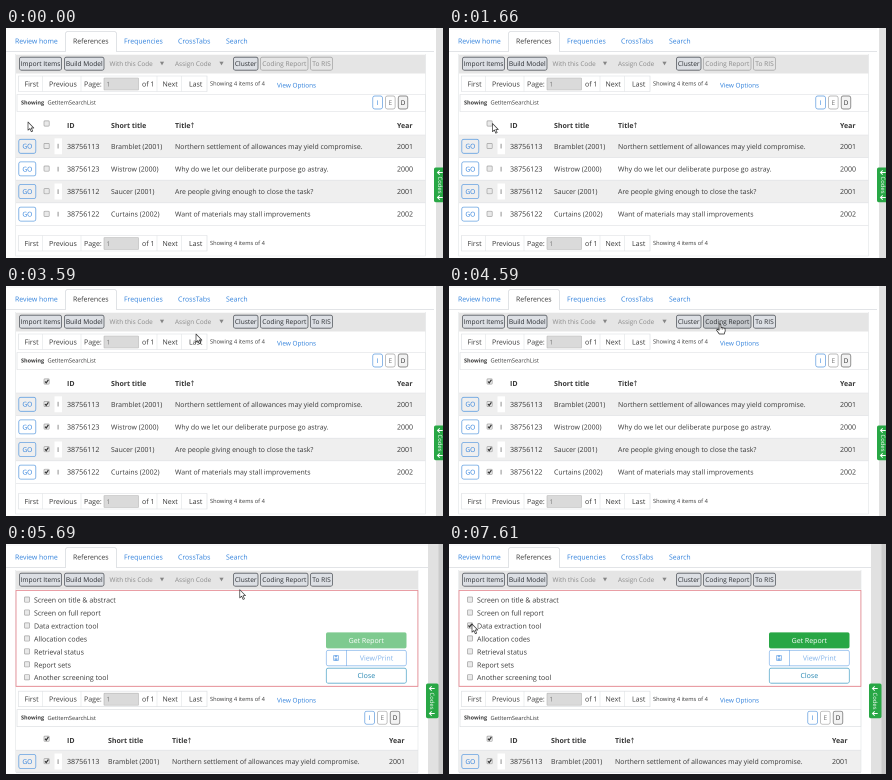
Write an HTML page with a canvas that moves like this. It is 437 px wide and 230 px high and loops after 8000 ms.

```html
<!DOCTYPE html>
<html lang="en">
<head>
<meta charset="utf-8">
<title>Reference list</title>
<style>
html, body { margin: 0; width: 100%; height: 100%; overflow: hidden; background: #fff; }
canvas { display: block; width: 437px; height: 230px; }
</style>
</head>
<body>
<canvas id="stage"></canvas>
<script>
const W = 437, H = 230, LOOP = 8000;
const FONT = '"Open Sans", "Noto Sans", sans-serif';
const INK = '#383838', BLUE = '#2f80dc', LINE = '#d9dce0', GREEN = '#28a745';
const canvas = document.getElementById('stage');
const ctx = canvas.getContext('2d');
const scale = 2 * Math.max(1, window.devicePixelRatio || 1);
canvas.width = W * scale;
canvas.height = H * scale;

const rows = [
  ['38756113', 'Bramblet (2001)', 'Northern settlement of allowances may yield compromise.', '2001'],
  ['38756123', 'Wistrow (2000)', 'Why do we let our deliberate purpose go astray.', '2000'],
  ['38756112', 'Saucer (2001)', 'Are people giving enough to close the task?', '2001'],
  ['38756122', 'Curtains (2002)', 'Want of materials may stall improvements', '2002']
];
const options = ['Screen on title & abstract', 'Screen on full report', 'Data extraction tool',
  'Allocation codes', 'Retrieval status', 'Report sets', 'Another screening tool'];

// Pointer legs: first step, last step, step count, end point
const legs = [
  [800, 1600, 12, 42.5, 95],
  [1660, 1660, 1, 43.5, 95.5],
  [3110, 3590, 9, 190, 48],
  [3650, 3890, 5, 288, 40],
  [3950, 4080, 3, 265, 39],
  [4200, 4200, 1, 271, 38],
  [5570, 6290, 13, 67.5, 80],
  [6350, 6350, 1, 60, 80],
  [6410, 6470, 2, 32, 80],
  [6730, 6850, 3, 20, 86],
  [6910, 6970, 2, 23, 80]
];

function pointerAt(t) {
  let x = 22, y = 94;
  for (const [from, to, n, ex, ey] of legs) {
    if (t < from) break;
    const gap = n > 1 ? (to - from) / (n - 1) : 1;
    const p = Math.min(n, Math.floor((t - from) / gap + 1e-6) + 1) / n;
    const e = n > 8 ? p * p * (3 - 2 * p) * 0.5 + p * 0.5 : p;
    x += (ex - x) * e;
    y += (ey - y) * e;
  }
  return { x, y };
}

function text(s, x, y, size = 7, color = INK, weight = 400, align = 'left') {
  ctx.font = `${weight} ${size}px ${FONT}`;
  ctx.textAlign = align;
  ctx.fillStyle = color;
  ctx.fillText(s, x, y + size * 0.36);
}

function rect(x, y, w, h, fill, stroke, r = 0, lw = 0.6) {
  ctx.beginPath();
  ctx.roundRect(x, y, w, h, r);
  if (fill) { ctx.fillStyle = fill; ctx.fill(); }
  if (stroke) { ctx.strokeStyle = stroke; ctx.lineWidth = lw; ctx.stroke(); }
}

function path(points, color, width, fill) {
  ctx.beginPath();
  points.forEach(([x, y], i) => i ? ctx.lineTo(x, y) : ctx.moveTo(x, y));
  if (fill) { ctx.closePath(); ctx.fillStyle = fill; ctx.fill(); }
  ctx.strokeStyle = color;
  ctx.lineWidth = width;
  ctx.stroke();
}

function checkbox(x, y, on) {
  rect(x - 2.6, y - 2.6, 5.2, 5.2, '#e9e9e9', '#a2a2a2', 0.8, 0.7);
  if (on) path([[x - 1.6, y], [x - 0.4, y + 1.4], [x + 1.8, y - 1.7]], '#333', 1.2);
}

function button(s, x, y, w, h, o = {}) {
  rect(x, y, w, h, o.fill, o.stroke, 2, o.lw || 0.8);
  text(s, x + w / 2, y + h / 2, o.size || 7, o.color, o.weight, 'center');
}

function drawTabs() {
  path([[0, 1], [428, 1]], '#e3e6ea', 0.6);
  path([[0, 23.5], [59.5, 23.5], [59.5, 5], [61, 3.5], [109, 3.5], [110.5, 5], [110.5, 23.5], [428, 23.5]], LINE, 0.8);
  text('Review home', 9, 13, 6.9, BLUE);
  text('References', 67, 13, 6.9, INK);
  text('Frequencies', 118, 13, 6.9, BLUE);
  text('CrossTabs', 172, 13, 6.9, BLUE);
  text('Search', 220, 13, 6.9, BLUE);
}

function drawToolbar(s) {
  rect(10, 26.8, s.right - 10, 18.7, '#e5e5e5');
  const tool = (label, x, w, on = true, hover = false) =>
    button(label, x, 29.2, w, 13, {
      size: 6.6, fill: hover ? '#c6c9cd' : on ? '#dcdfe4' : '#e5e5e5',
      stroke: on ? '#5a5e64' : '#a9a9a9', color: on ? '#2b2e32' : '#8a8a8a'
    });
  tool('Import Items', 13.5, 42);
  tool('Build Model', 58.5, 39.5);
  tool('Cluster', 227.5, 24.5);
  tool('Coding Report', 254.5, 47.5, s.enabled, s.hover);
  tool('To RIS', 304.5, 22, s.enabled);
  const drop = (label, x, ax) => {
    text(label, x, 35.5, 6.4, '#8b8b8b');
    path([[ax, 33.8], [ax + 4, 33.8], [ax + 2, 37.2]], '#858585', 0.1, '#858585');
  };
  drop('With this Code', 103.5, 154);
  drop('Assign Code', 169, 213.5);
}

function drawPager(y) {
  rect(12.5, y - 8, 188.5, 15.5, '#fff', LINE);
  for (const x of [36.5, 75, 151, 175.5]) path([[x, y - 8], [x, y + 7.5]], '#e2e4e7', 0.6);
  text('First', 18.5, y);
  text('Previous', 43, y);
  text('Page:', 78, y);
  rect(98, y - 6, 34.5, 12, '#dadada', '#b8b8b8', 0.5);
  text('1', 100.5, y, 6.5, '#777');
  text('of 1', 136, y);
  text('Next', 156.5, y);
  text('Last', 183, y);
  text('Showing 4 items of 4', 204, y - 0.5, 5.7);
}

function drawList(s) {
  const { dy, right } = s, shift = s.open ? 3 : 0, end = s.open ? 8 : 0;
  ctx.save();
  ctx.translate(0, dy);
  drawPager(56);
  text('View Options', 271, 57, 6.4, BLUE);
  rect(11, 66.5, right - 11, 17, '#fff', LINE);
  text('Showing', 15, 74.5, 5.5, INK, 700);
  text('GetItemSearchList', 41.5, 74.5, 5.7);
  ['I', 'E', 'D'].forEach((c, i) => {
    button(c, 366.8 - end + i * 12.7, 68, 9.6, 13,
      { size: 6.5, fill: i === 2 ? '#f3f3f3' : '#fff', stroke: ['#5c9ade', '#a5a5a5', '#6a6a6a'][i],
        color: [BLUE, '#777', '#333'][i], lw: 0.7 });
  });
  checkbox(40.6, 95.5, s.all);
  text('ID', 61, 97.5, 7, INK, 700);
  text('Short title', 105 - shift, 97.5, 7, INK, 700);
  text('Title', 169 - shift, 97.5, 7, INK, 700);
  const ax = 186.5 - shift;
  path([[ax, 100], [ax, 94.8]], INK, 0.6);
  path([[ax - 1.2, 96.2], [ax, 94.8], [ax + 1.2, 96.2]], INK, 0.6);
  text('Year', 391 - end, 97.5, 7, INK, 700);
  rows.forEach(([id, name, title, year], i) => {
    const y = 118.3 + i * 22.6;
    rect(10, y - 11.3, right - 10, 22.6, i % 2 ? '#fff' : '#efefef');
    path([[10, y - 11.3], [right, y - 11.3]], '#dfe2e5', 0.6);
    button('GO', 12.8, y - 7, 17, 14, { size: 6.6, stroke: '#68a3e2', color: BLUE });
    checkbox(40.6, y - 0.3, s.rows);
    rect(48.5, y - 8, 7.5, 16, '#fff');
    text('I', 52, y, 6.6, INK, 400, 'center');
    text(id, 61, y, 7.1);
    text(name, 105 - shift, y, 6.9);
    text(title, 169 - shift, y, 6.9);
    text(year, 391 - end, y, 7);
  });
  path([[10, 197.4], [right, 197.4]], '#dfe2e5', 0.6);
  drawPager(215.5);
  ctx.restore();
  path([[9.7, 26], [9.7, 228], [right, 228]], '#e2e4e7', 0.6);
  path([[right, 26], [right, 228]], '#e2e4e7', 0.6);
}

function drawPanel(s) {
  rect(10, 46.5, 401.9, 95.8, '#fff', '#e27f88', 0, 0.8);
  options.forEach((label, i) => {
    const y = 56 + i * 12.95;
    checkbox(21, y - 0.4, i === 2 && s.picked);
    text(label, 28, y, 7);
  });
  ctx.globalAlpha = 0.6 + 0.4 * s.ready;
  rect(320, 88.4, 80.5, 16, GREEN, null, 2);
  ctx.globalAlpha = 1;
  text('Get Report', 360.3, 96.4, 7, '#fff', 400, 'center');
  ctx.globalAlpha = 0.6;
  rect(320.3, 106.3, 80, 15.5, '#fff', '#4b93e2', 2, 0.8);
  path([[340.5, 106.3], [340.5, 121.8]], '#4b93e2', 0.8);
  rect(327.5, 111.5, 5, 5, null, BLUE, 0.5, 0.8);
  rect(328.7, 111.5, 2.5, 1.7, BLUE);
  rect(328.5, 114.3, 3, 2.2, BLUE);
  text('View/Print', 370.5, 114, 7, BLUE, 400, 'center');
  ctx.globalAlpha = 1;
  button('Close', 320.3, 124.2, 80, 15, { fill: '#fff', stroke: '#5fadcd', color: '#2787b2' });
}

function drawSide(open) {
  const x = open ? 420 : 428, cx = x + 6.2;
  rect(x + 2, 0, W - x - 2, H, '#e1e1e1');
  if (open) rect(432.5, 0, 5, H, '#cbcbcb');
  rect(x, 139.5, 12.5, 34.8, GREEN, null, 2);
  ctx.save();
  ctx.translate(cx, 157);
  ctx.rotate(Math.PI / 2);
  text('Codes', 0, 0, 5.9, '#fff', 400, 'center');
  ctx.restore();
  for (const y of [144.5, 169.5]) {
    path([[cx - 2.5, y], [cx + 2.5, y]], '#fff', 1);
    path([[cx - 0.5, y - 2.2], [cx - 2.7, y], [cx - 0.5, y + 2.2]], '#fff', 1);
  }
}

function drawPointer({ x, y }, kind) {
  ctx.save();
  ctx.translate(x, y);
  ctx.lineJoin = 'round';
  if (kind === 'arrow') {
    path([[0, 0], [0, 8.2], [1.9, 6.5], [3.3, 9.7], [4.7, 9.1], [3.3, 6], [5.8, 6]], '#333', 0.7, '#fff');
  } else if (kind === 'beam') {
    path([[-1.6, -4.5], [0, -4], [1.6, -4.5]], '#222', 0.7);
    path([[0, -4], [0, 4]], '#222', 0.8);
    path([[-1.6, 4.5], [0, 4], [1.6, 4.5]], '#222', 0.7);
  } else {
    path([[-0.9, 0], [0.7, 0], [1, 3.4], [5, 4.4], [5.2, 7], [4.2, 10], [-0.7, 10],
      [-3.4, 6.3], [-2.8, 5.2], [-0.9, 6.2]], '#222', 0.7, '#fff');
    path([[1, 3.4], [1, 5.4]], '#222', 0.5);
    path([[2.8, 4], [2.8, 5.6]], '#222', 0.5);
  }
  ctx.restore();
}

function draw(t) {
  const open = t >= 4720, p = pointerAt(t);
  const enabled = t >= 2380;
  const hover = enabled && p.x > 254 && p.x < 302 && p.y > 29 && p.y < 42.5;
  const s = {
    open, enabled, hover, dy: open ? 99.2 : 0, right: open ? 412 : 419.5,
    all: t >= 2120, rows: enabled, picked: t >= 7300,
    ready: Math.min(1, Math.max(0, (t - 7300) / 180))
  };
  ctx.setTransform(scale, 0, 0, scale, 0, 0);
  ctx.textRendering = 'geometricPrecision';
  ctx.fillStyle = '#fff';
  ctx.fillRect(0, 0, W, H);
  drawTabs();
  drawList(s);
  drawToolbar(s);
  if (open) drawPanel(s);
  drawSide(open);
  const overLabel = open && p.x > 28 && p.x < 112 && p.y > 50 && p.y < 140;
  drawPointer(p, hover ? 'hand' : overLabel ? 'beam' : 'arrow');
}

const start = performance.now();
function frame() {
  draw((performance.now() - start) % LOOP);
  requestAnimationFrame(frame);
}
frame();
</script>
</body>
</html>
```
